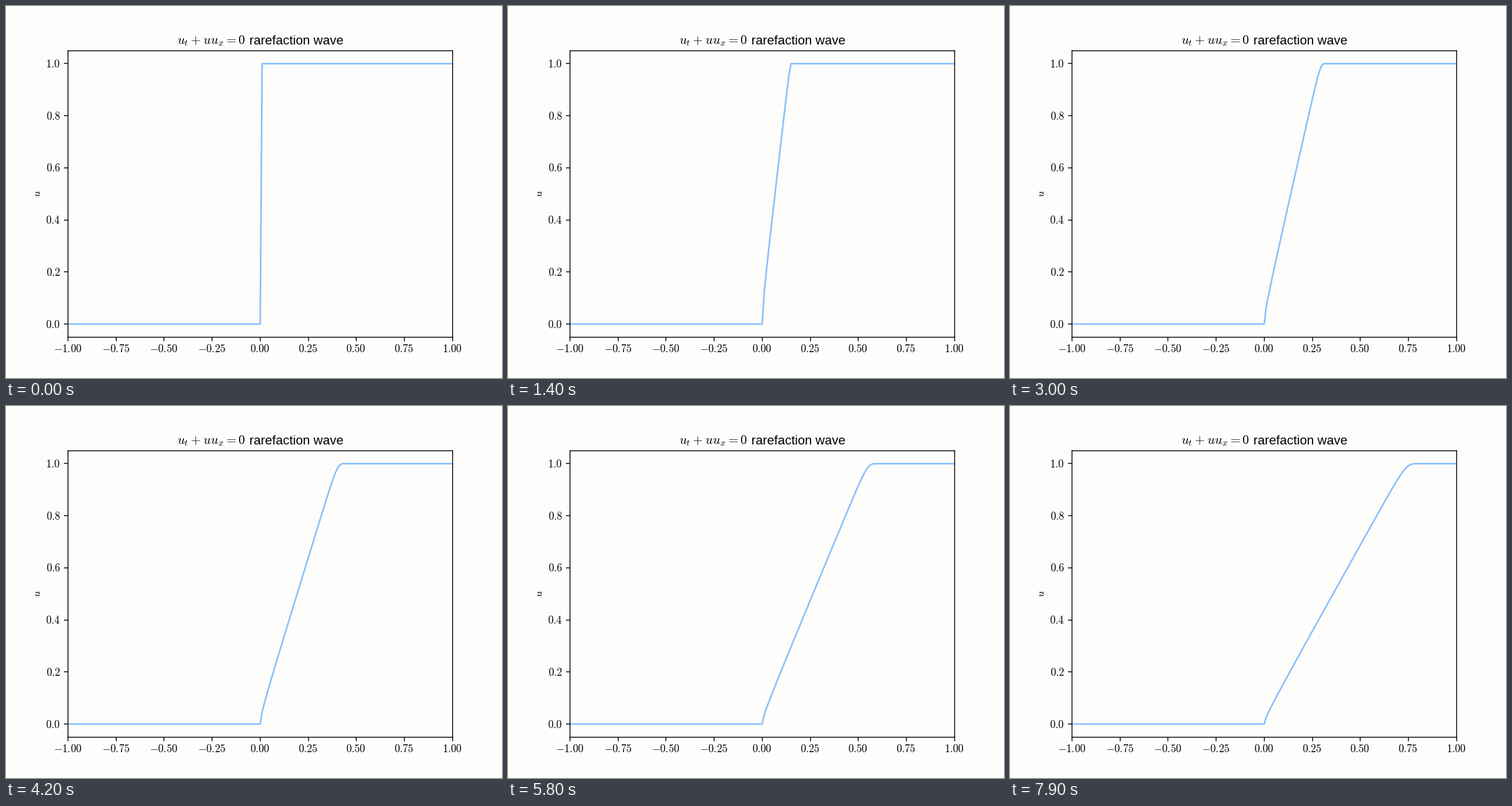
Recreate the animation shown at these times as a matplotlib script. Size 864x648 px, loop 8 s.

```python
import numpy as np
import matplotlib.pyplot as plt
from matplotlib.animation import FuncAnimation

W, H, DPI = 864, 648, 135
FRAMES = 80
CFL = 0.9
PAPER = "#fdfdfc"
BLUE = "#8ac1fc"

plt.rcParams.update({
    "font.family": "Liberation Sans",
    "mathtext.fontset": "cm",
    "font.size": 10,
})

fig, ax = plt.subplots(figsize=(W / DPI, H / DPI), dpi=DPI, facecolor=PAPER)
ax.set_facecolor(PAPER)
ax.set(xlim=(-1, 1), ylim=(-0.05, 1.05))
xticks = np.linspace(-1, 1, 9)
yticks = np.linspace(0, 1, 6)
ax.set_xticks(xticks, [""] * len(xticks))
ax.set_yticks(yticks, [""] * len(yticks))


def label(x, y, s, **kw):
    """Text at pixel (x, y), measured from the top left, on its baseline."""
    kw = {"ha": "center", "va": "baseline", **kw}
    return fig.text(x / W, 1 - y / H, s, **kw)


def to_pixel(x, y):
    px, py = ax.transData.transform((x, y))
    return px, H - py


for v in xticks:
    label(to_pixel(v, 0)[0] - 0.6, 603.4, f"${v:.2f}$")
for v in yticks:
    label(94.6, to_pixel(0, v)[1] + 6.5, f"${v:.1f}$", ha="right")

label(60, 327.2, "$u$", rotation=90, rotation_mode="anchor")
label(297.6, 66.6, "$u_t + uu_x = 0$", ha="left", fontsize=12)
label(424, 66.6, "rarefaction wave", ha="left", fontsize=11.9)


def upwind(u):
    """One conservative upwind step of Burgers' equation."""
    flux = u ** 2 / 2
    new = u.copy()
    new[1:] -= CFL * np.diff(flux)
    return new


x = np.linspace(-1, 1, 201)
states = [(np.arange(x.size) > 100).astype(float)]
for _ in range(FRAMES - 1):
    states.append(upwind(states[-1]))

line, = ax.plot(x, states[0], color=BLUE, lw=1.5)


def update(i):
    line.set_ydata(states[i])
    return line,


anim = FuncAnimation(fig, update, frames=FRAMES, interval=100,
                     repeat=True, repeat_delay=0)
plt.show()
```
